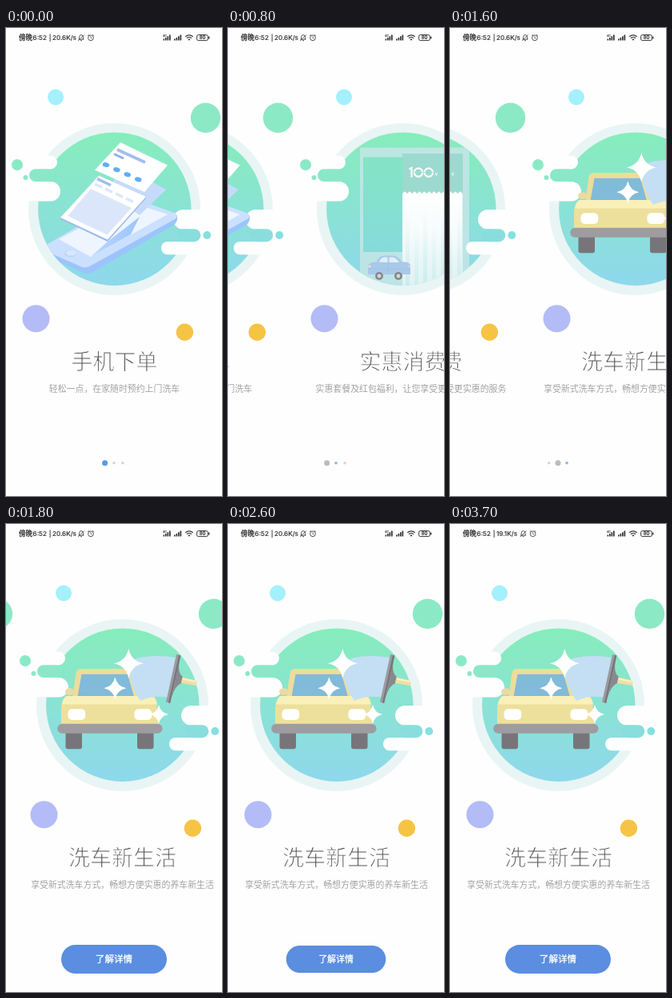
Animation, 270 px wide and 585 px high, one loop 3800 ms. Source, as an HTML page:

```html
<!DOCTYPE html>
<html lang="zh-CN">
<head>
<meta charset="utf-8">
<title>引导页</title>
<style>
  html, body { margin: 0; width: 100%; height: 100%; overflow: hidden; background: #fefefe; }
  svg { display: block; width: 100%; height: 100%; }
  text { font-family: "Noto Sans CJK SC", "Noto Sans CJK", sans-serif; }
  /* a stroke in the page colour slims the regular weight */
  .title { font-size: 27px; font-weight: 100; fill: #505050; stroke: #fefefe; stroke-width: 1; text-anchor: middle; }
  .sub { font-size: 10.9px; font-weight: 300; fill: #a2a2a2; text-anchor: middle; }
  .bar { font-size: 8.6px; font-weight: 500; fill: #333; stroke: #333; stroke-width: .3; }
  .num { font: 500 8px Inter, sans-serif; fill: #333; stroke: #333; stroke-width: .12; }
  .cta { font-size: 11.6px; font-weight: 500; fill: #fff; stroke: #fff; stroke-width: .3; text-anchor: middle; }
</style>
</head>
<body>
<svg viewBox="0 0 270 585">
  <defs>
    <linearGradient id="sky" x1="0" y1="0" x2="0" y2="1">
      <stop offset="0" stop-color="#86edbb"/>
      <stop offset="1" stop-color="#8ed8ec"/>
    </linearGradient>
    <linearGradient id="paper" x1="0" y1="0" x2="0" y2="1">
      <stop offset="0" stop-color="#fff"/>
      <stop offset=".4" stop-color="#fff" stop-opacity=".88"/>
      <stop offset="1" stop-color="#fff" stop-opacity=".5"/>
    </linearGradient>
    <linearGradient id="fold" x1="0" y1="0" x2="0" y2="1">
      <stop offset="0" stop-color="#8fd9d8" stop-opacity="0"/>
      <stop offset="1" stop-color="#8fd9d8" stop-opacity=".25"/>
    </linearGradient>
    <linearGradient id="screen" x1="0" y1="0" x2="1" y2="0">
      <stop offset="0" stop-color="#b9d6ff"/>
      <stop offset="1" stop-color="#9cc5fd"/>
    </linearGradient>
    <clipPath id="disc"><circle cx="135.8" cy="226.2" r="95.7"/></clipPath>
  </defs>
  <g id="pages"></g>
  <g id="dots"></g>
  <g id="button">
    <rect x="-66" y="-18" width="132" height="36" rx="18" fill="#5b8de0"/>
    <text class="cta" y="4.2">了解详情</text>
  </g>
  <g id="status"></g>
</svg>
<script>
const LOOP = 3800, STEP = 100, WIDTH = 270;
const $ = id => document.getElementById(id);

const circle = (x, y, r, fill, more = '') => `<circle cx="${x}" cy="${y}" r="${r}" fill="${fill}" ${more}/>`;
const rect = (x, y, w, h, fill, rx = 0, more = '') =>
  `<rect x="${x}" y="${y}" width="${w}" height="${h}" rx="${rx}" fill="${fill}" ${more}/>`;
const path = (d, fill, more = '') => `<path d="${d}" fill="${fill}" ${more}/>`;
const line = (d, stroke, width) => `<path d="${d}" fill="none" stroke="${stroke}" stroke-width="${width}"/>`;
const ring = (x, y, r, stroke, width) => circle(x, y, r, 'none', `stroke="${stroke}" stroke-width="${width}"`);
const star = (x, y, r) => {
  const k = r * 0.17;
  return path(`M${x} ${y - r}Q${x + k} ${y - k} ${x + r} ${y}Q${x + k} ${y + k} ${x} ${y + r}` +
    `Q${x - k} ${y + k} ${x - r} ${y}Q${x - k} ${y - k} ${x} ${y - r}Z`, '#fff');
};
const row = (n, draw) => Array.from({ length: n }, (_, i) => draw(i)).join('');

const backdrop =
  circle(62, 86.5, 10, '#a4f0fd') +
  circle(249.5, 112.3, 18.7, '#8ce9c5') +
  circle(14, 171, 7, '#8ce9c5') +
  circle(24.5, 187, 3, '#8ce9c5') +
  circle(135.5, 226.5, 107.5, '#e8f5f4') +
  circle(135.8, 226.2, 95.7, 'url(#sky)') +
  circle(251.3, 259, 4.9, '#86dfe0') +
  circle(37.5, 363.2, 17, '#b3bcf6') +
  circle(223.4, 380.2, 10.7, '#f6c445');

const clouds =
  rect(28, 159.5, 36, 17, '#fefefe', 8.5) +
  rect(27.5, 192, 40.5, 24.5, '#fefefe', 12.2) +
  rect(27.5, 167, 13, 49.5, '#fefefe') +
  rect(29, 176.3, 31, 15.8, '#8ae8c9', 7.9) +
  rect(209, 227, 46, 24.5, '#fefefe', 12.2) +
  rect(194, 267, 52, 16.3, '#fefefe', 8.1) +
  rect(229, 240, 17, 36, '#fefefe') +
  rect(214, 251.2, 29.3, 16, '#89dedd', 8);

function phone() {
  const dots = row(4, i =>
    `<ellipse rx="4.3" ry="2.9" fill="#5cb0f6" transform="translate(${125 + i * 13.4} ${171 + i * 6.1}) rotate(15)"/>`);
  const tabs = row(4, i => line(`M${111 + i * 13} ${195 + i * 6}l9 4.2`, '#dce6fa', 3.4));
  return clouds + '<g clip-path="url(#disc)">' +
    path('M44 277Q47 284 54 287L95 305Q102 309 109 305L210 246Q215 243 214 234Z', '#9cc4fb') +
    path('M40 277L148 214Q154 211 160 213L210 231Q217 235 211 239L106 297Q100 301 93 298L48 278Z', '#cbe0ff') +
    path('M66 264L153 217L202 233L106 286Z', '#eef5ff') +
    path('M106 286L156 258L167 236L127 267Z', 'url(#screen)') +
    '<ellipse cx="81" cy="282" rx="8" ry="4.3" fill="#b9d3f8"/>' +
    '<ellipse cx="81.5" cy="281.3" rx="6.8" ry="3.3" fill="#d8e7fe"/></g>' +
    path('M143 170L200 202L167 234L128 206Z', '#c6dbfb') +
    path('M143 143L202 171.5L173 205L111 177.5Z', '#fff') +
    line('M139 152L174 168', '#a3bcec', 3.6) +
    line('M135 157.5L147 163', '#8faee6', 3) + dots +
    path('M68 237L68 239L127 267L175 213L175 210Z', '#9fb9ea') +
    path('M116 184.5L175 211L127 264.5L68 237Z', '#fff') +
    line('M114 188.5L131 196.5', '#a3bcec', 3.4) + tabs +
    path('M106 201L157 225L126.5 258.5L77 235Z', '#dce6fb');
}

function booth() {
  const teeth = row(9, i => circle(138 + i * 6.1, 206.5, 1.9, '#fff'));
  const folds = row(5, i => rect(139 + i * 11, 222 + i % 2 * 22, 5, 100, 'url(#fold)'));
  const wheels = [106, 130].map(x => circle(x, 310, 5, '#85888e') + circle(x, 310, 2.4, '#d9d5d0')).join('');
  return '<g clip-path="url(#disc)">' +
    path('M82 149.5H198V325H82ZM86 161.5V280H135V161.5Z', '#c2e6e6', 'fill-rule="evenodd" opacity=".9"') +
    rect(86, 161.5, 49, 118.5, '#70cfc0', 0, 'opacity=".2"') +
    rect(135, 157, 55, 50, '#9cdacf') +
    rect(135, 206.5, 54.5, 118, 'url(#paper)') + teeth + folds + '</g>' +
    line('M143.5 176.5L146.5 174.8V186.6', '#fff', 2.2) +
    ring(155, 180.6, 5.2, '#fff', 2.2) + ring(167.8, 180.6, 5.2, '#fff', 2.2) +
    line('M148.5 180.6H174.5', '#9cdacf', 0.8) +
    '<text x="175.5" y="184.5" font-size="6.5" fill="#fff">¥</text>' +
    path('M92 299Q91 294 98 293L103 292Q106 284.5 112 284.5H124Q129 285 134 292L141 293Q146 294 145 301V308H92Z', '#a8c9e9') +
    path('M105.5 292.5Q108.5 286.5 112 286.5H116.5V293ZM118.5 286.5H123Q127 287 131 293H118.5Z', '#e0eff8') +
    line('M92 301H145M117.5 293V306', '#9dc0e2', 0.6) +
    circle(94, 298, 1.6, '#f4e8cf') + circle(143.5, 298, 1.5, '#f0c9b8') + wheels + clouds;
}

function wash() {
  return clouds +
    rect(64.5, 258, 20.5, 23.3, '#78757a', 3) + rect(154, 258, 20.5, 23.3, '#78757a', 3) +
    '<ellipse cx="69.5" cy="209.5" rx="5.5" ry="4.3" fill="#efd9a2"/>' +
    path('M73 217L77.5 186Q78.5 181 84 181H141Q147 181 149 186L158 217Z', '#ecdd9b') +
    path('M84.5 187.7H142L150 216H79.5Z', '#82bad9') +
    path('M65 215H173Q177 216 178 221L181 252H59V230Q60 219 65 215Z', '#ede09c') +
    path('M66 215H172Q178 218 179 225.5H60Q61 218 66 215Z', '#f9f0ba') +
    rect(67.5, 231.3, 21.7, 13.7, '#fff', 5) + rect(150.5, 231.3, 21.7, 13.7, '#fff', 5) +
    rect(54.2, 249.7, 131.3, 12, '#9e9ca1', 6) +
    path('M143 184Q147 169 157 167Q180 163 202 167L193 217Q175 213 158 221Q147 206 143 184Z', '#c4dff4') +
    path('M207 170Q204 186 211 191L209 199Q201 202 197 217Z', '#8a888e') +
    path('M203 163L208 164L195 224L190 222.5Z', '#9c9aa0') +
    path('M206 164L208.4 164.4L195.2 224L193 223.3Z', '#77757b') +
    path('M210.5 191.5L227 195.5Q230 199 227 202L209 198.8Z', '#f0dfa2') +
    line('M211 193.5L227 197', '#faf0c8', 2) +
    star(143.3, 174.3, 18.5) + star(126.3, 205.3, 14) + star(181, 238, 12);
}

const pages = [
  [phone, '手机下单', '轻松一点，在家随时预约上门洗车'],
  [booth, '实惠消费', '实惠套餐及红包福利，让您享受更实惠的服务'],
  [wash, '洗车新生活', '享受新式洗车方式，畅想方便实惠的养车新生活']
];
$('pages').innerHTML = pages.map(([art, title, sub], i) =>
  `<g transform="translate(${i * WIDTH})">${backdrop}${art()}` +
  `<text class="title" x="135.5" y="427">${title}</text>` +
  `<text class="sub" x="135.5" y="455">${sub}</text></g>`).join('');

const bars = x => [2, 3.6, 5.2, 7].map((h, i) => rect(x + i * 2.5, 15.5 - h, 1.7, h, '#333', 0.3)).join('');
$('status').innerHTML =
  '<text class="bar" x="16" y="15.2">傍晚</text><text class="num" x="33.6" y="15">6:52</text>' +
  '<text class="num" x="53.8" y="14.6">|</text><text class="num" id="speed" x="58" y="15"></text>' +
  '<g id="icons">' +
  line('M90.5 14.2H97.5M91.5 14V11.5Q91.7 8.7 94 8.6Q96.4 8.7 96.5 11.5V14M93 15.7H95M97.7 8.5L90.3 16', '#444', 0.9) +
  ring(106, 12.3, 3.4, '#444', 0.9) +
  line('M106 10.3V12.5L107.6 13.3M102.2 9.8L104 8.2M109.8 9.8L108 8.2', '#444', 0.8) + '</g>' +
  bars(196.5) + bars(210) +
  '<text class="num" x="196" y="11" style="font-size:3.5px">4G</text>' +
  line('M224.3 10.8Q229 6.8 233.7 10.8M226 12.8Q229 10.2 232 12.8', '#333', 1.2) +
  path('M227.4 14L229 15.8L230.6 14Q229 12.8 227.4 14Z', '#333') +
  rect(238.6, 8.6, 13.8, 7, 'none', 2, 'stroke="#333" stroke-width="1"') +
  rect(253.2, 10.6, 1.3, 3, '#333', 0.5) +
  '<text class="num" x="245.5" y="14.2" text-anchor="middle" style="font-size:5.8px;font-weight:700">80</text>';

$('dots').innerHTML = [123.6, 135, 146].map(x => circle(x, 543.7, 1.8, '#c9ced6')).join('');
const dots = [...$('dots').children];

// Two swipes: [time, scroll]
const scroll = [
  [300, 0], [400, 6], [500, 30], [600, 78], [700, 132], [800, 187], [900, 236], [1000, 262], [1100, 270],
  [1400, 270], [1500, 345], [1600, 444], [1700, 504], [1800, 530], [1900, 538], [2000, 540]
];

function track(t, points) {
  const i = points.findIndex(p => p[0] > t);
  if (i < 0) return points[points.length - 1][1];
  if (i === 0) return points[0][1];
  const [t0, a] = points[i - 1], [t1, b] = points[i];
  return a + (b - a) * (t - t0) / (t1 - t0);
}

function render(t) {
  $('pages').setAttribute('transform', `translate(${-track(t, scroll)})`);

  const picked = t < 700 ? 0 : t < 1600 ? 1 : 2;
  const large = t < 1000 ? 0 : 1;
  dots.forEach((dot, i) => {
    dot.setAttribute('r', i === large ? 3.5 : 1.8);
    dot.setAttribute('fill', i === picked ? (i === large ? '#5b98e6' : '#86b4ec') : (i === large ? '#bcbcbc' : '#d0d6de'));
  });

  const done = t >= 1800;
  $('dots').style.display = done ? 'none' : '';
  $('button').style.display = done ? '' : 'none';
  const scale = 0.97 + 0.03 * Math.cos((t - 1760) / 1000 * Math.PI);
  $('button').setAttribute('transform', `translate(135 544) scale(${scale})`);

  const late = t >= 2900;
  $('speed').textContent = late ? '19.1K/s' : '20.6K/s';
  $('icons').setAttribute('transform', `translate(${late ? -2.4 : 0})`);
}

const start = performance.now();
function tick() {
  const t = (performance.now() - start) % LOOP;
  render(Math.floor(t / STEP) * STEP);
  requestAnimationFrame(tick);
}
tick();
</script>
</body>
</html>
```
